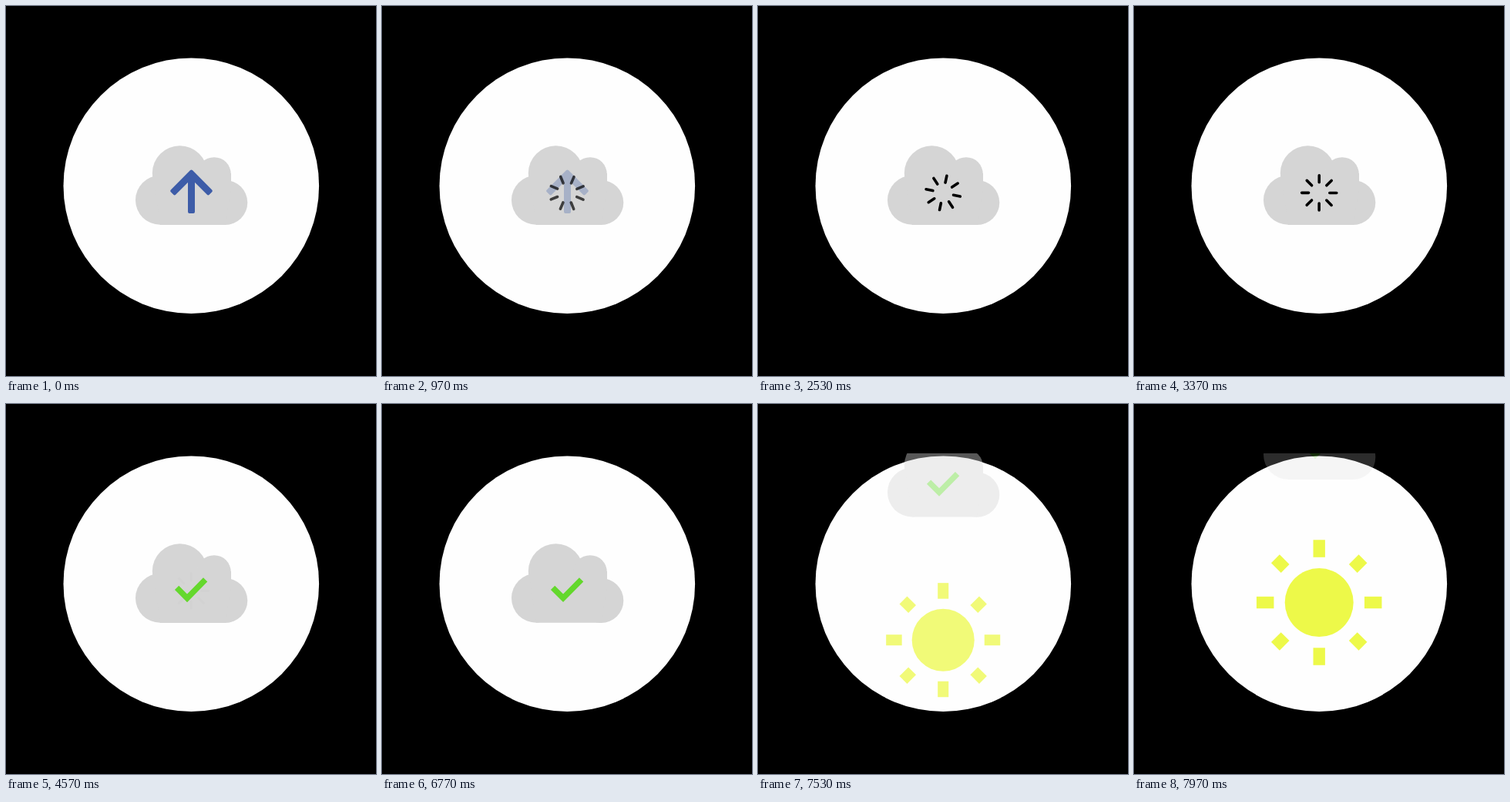
An HTML page for the animation above (8 s loop, 480 by 480 pixels).

```html
<!DOCTYPE html>
<html lang="en">
<head>
<meta charset="utf-8">
<title>Cloud upload</title>
<style>
  html, body { margin: 0; width: 100%; height: 100%; overflow: hidden; background: #000; }
  svg { display: block; width: 100%; height: 100%; }
</style>
</head>
<body>
<svg viewBox="0 0 480 480">
  <defs>
    <clipPath id="view"><rect x="60" y="64" width="360" height="346"/></clipPath>
  </defs>
  <circle cx="240.3" cy="233.2" r="165.8" fill="#fefefe"/>
  <g clip-path="url(#view)">
    <g id="sun" fill="#ebf932"><circle r="44.5"/></g>
    <g id="cloud">
      <g fill="#d5d5d5">
        <circle cx="225.5" cy="217" r="35.7"/>
        <circle cx="270" cy="218" r="21.8"/>
        <circle cx="200" cy="251.8" r="32"/>
        <circle cx="284.3" cy="255" r="29"/>
        <path d="M190 217H292V240L284 283.9H200Z"/>
      </g>
      <path id="arrow" fill="#3d5ca8" stroke="#3d5ca8" stroke-width="4" stroke-linejoin="round"
            d="M240.5 214.5L215.2 239.8L218.7 243.3L238 224V267H243V224L262.3 243.3L265.8 239.8Z"/>
      <g id="spinner" stroke="#000" stroke-width="3.6" stroke-linecap="round"/>
      <path id="check" fill="none" stroke="#63d82c" stroke-width="7.5" d="M221.6 238.4L235 251.8L258.6 227.8"/>
    </g>
  </g>
</svg>
<script>
const LOOP = 8000;
const TO_SPINNER = 430, SPIN = 1930, TO_CHECK = 3430, STEP = 1500, FADE = 1300;
const RISE = 6770, RISE_TIME = 2000, TRAVEL = 210;

const [sun, cloud, arrow, spinner, check] =
  ["sun", "cloud", "arrow", "spinner", "check"].map(id => document.getElementById(id));

function add(parent, tag, attrs) {
  const el = document.createElementNS("http://www.w3.org/2000/svg", tag);
  for (const key in attrs) el.setAttribute(key, attrs[key]);
  parent.appendChild(el);
}

for (let i = 0; i < 8; i++) {
  const transform = `rotate(${i * 45})`;
  add(spinner, "line", { y1: -13.6, y2: -22.6, transform });
  const length = i % 2 ? 18 : 22.5;
  const middle = i % 2 ? 71.3 : 70;
  add(sun, "rect", { x: -7.7, y: -middle - length / 2, width: 15.4, height: length, transform });
}

const mix = (a, b, p) => a + (b - a) * p;

// cubic-bezier(.25, .1, .25, 1)
function ease(u) {
  if (u <= 0) return 0;
  if (u >= 1) return 1;
  const curve = (s, a, b) => 3 * a * s * (1 - s) ** 2 + 3 * b * s * s * (1 - s) + s ** 3;
  let lo = 0, hi = 1;
  for (let i = 0; i < 24; i++) {
    const mid = (lo + hi) / 2;
    if (curve(mid, .25, .25) < u) lo = mid; else hi = mid;
  }
  return curve(lo, .1, 1);
}

const progress = (t, start, time) => ease((t - start) / time);

function draw(t) {
  const load = progress(t, TO_SPINNER, FADE);
  const turns = progress(t, TO_SPINNER, STEP) + progress(t, SPIN, STEP);
  const done = progress(t, TO_CHECK, FADE);
  const rise = progress(t, RISE, RISE_TIME);

  arrow.setAttribute("opacity", 1 - load);
  spinner.setAttribute("opacity", load * (1 - done));
  spinner.setAttribute("transform", `translate(240.2 242.4) rotate(${-180 * turns})`);
  check.setAttribute("opacity", done);

  cloud.setAttribute("transform", `translate(0 ${-TRAVEL * rise})`);
  cloud.setAttribute("opacity", 1 - .9 * rise);

  sun.setAttribute("transform",
    `translate(240.2 ${443.5 - TRAVEL * rise}) scale(${mix(.66, 1.044, rise)})`);
  sun.setAttribute("opacity", rise);
}

const start = performance.now();
function frame() {
  draw((performance.now() - start) % LOOP);
  requestAnimationFrame(frame);
}
frame();
</script>
</body>
</html>
```
